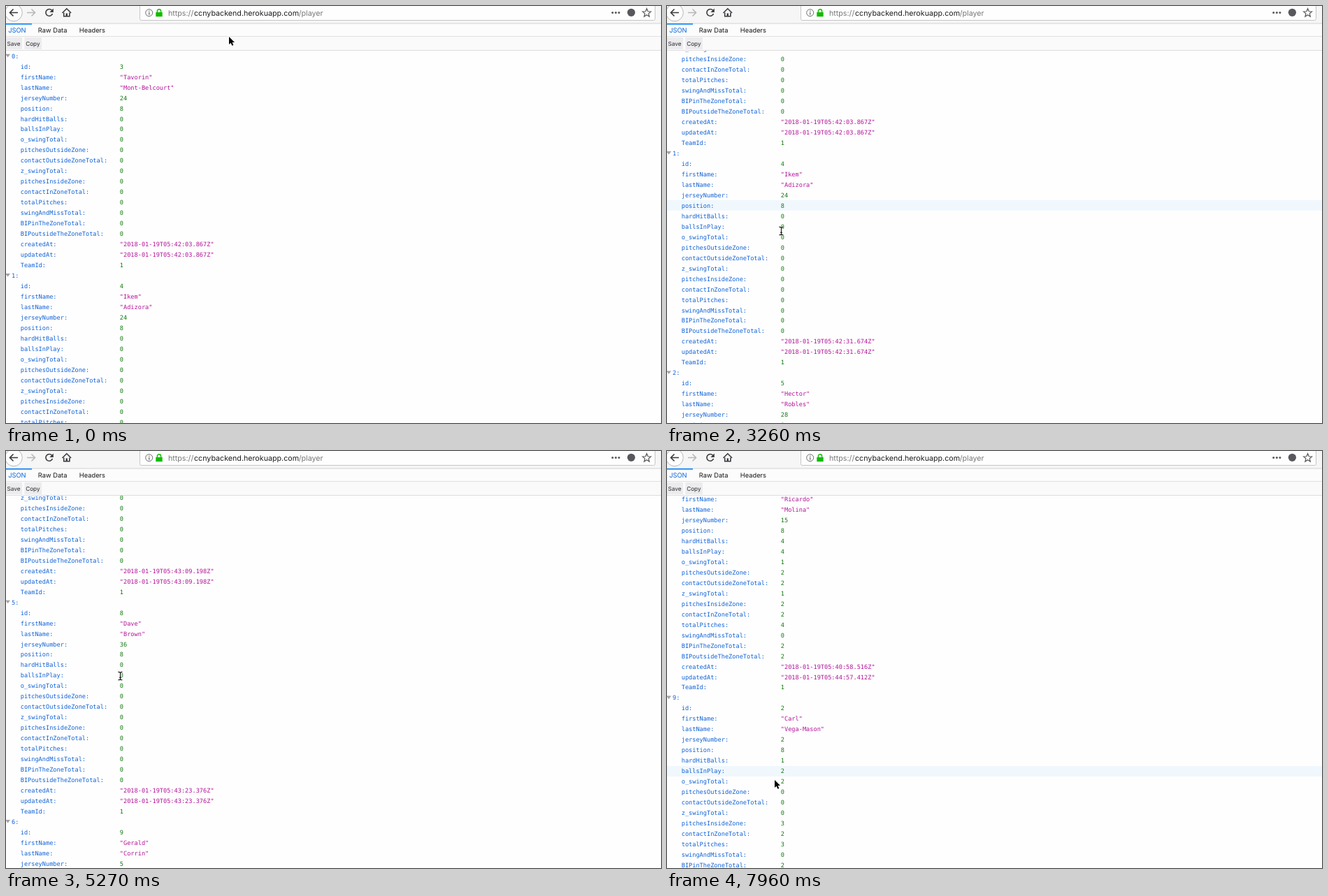
These frames come from a looping animation (937x597 px, 8 s). An HTML page with a canvas:

```html
<!DOCTYPE html>
<html lang="en">
<head>
<meta charset="utf-8">
<title>JSON viewer</title>
<style>
html, body { margin: 0; width: 100%; height: 100%; overflow: hidden; background: #fefefe; }
canvas { display: block; }
</style>
</head>
<body>
<canvas id="stage" width="937" height="597"></canvas>
<script>
const W = 937, H = 597, LOOP = 8000;
const ctx = document.getElementById('stage').getContext('2d');
const MONO = '8.62px "DejaVu Sans Mono", monospace';
const sans = px => px + 'px Inter, Roboto, sans-serif';
const BLUE = '#0f62d8', PINK = '#b4139a', GREEN = '#137a10', DARK = '#3b3b3f';

// Page content
const STATS = ['hardHitBalls', 'ballsInPlay', 'o_swingTotal', 'pitchesOutsideZone',
  'contactOutsideZoneTotal', 'z_swingTotal', 'pitchesInsideZone', 'contactInZoneTotal',
  'totalPitches', 'swingAndMissTotal', 'BIPinTheZoneTotal', 'BIPoutsideTheZoneTotal'];
const NONE = '000000000000';
const PLAYERS = [
  [3, 'Tavorin', 'Mont-Belcourt', 24, NONE, '42:03.867'],
  [4, 'Ikem', 'Adizora', 24, NONE, '42:31.674'],
  [5, 'Hector', 'Robles', 28, NONE, '42:43.216'],
  [6, 'Daniel', 'Ortega', 11, NONE, '42:56.430'],
  [7, 'Luis', 'Medina', 17, NONE, '43:09.198'],
  [8, 'Dave', 'Brown', 36, NONE, '43:23.376'],
  [9, 'Gerald', 'Corrin', 5, NONE, '43:38.052'],
  [10, 'Peter', 'Hollis', 21, NONE, '43:51.740'],
  [1, 'Ricardo', 'Molina', 15, '441221224022', '40:58.516', '44:57.412'],
  [2, 'Carl', 'Vega-Mason', 2, '122000323020', '41:22.305', '45:10.128']
];
const quote = s => '"' + s + '"';
const stamp = s => quote('2018-01-19T05:' + s + 'Z');
const rows = PLAYERS.flatMap(([id, first, last, jersey, stats, made, changed = made], n) => [
  [n],
  ['id', id], ['firstName', quote(first)], ['lastName', quote(last)],
  ['jerseyNumber', jersey], ['position', 8],
  ...STATS.map((key, i) => [key, +stats[i]]),
  ['createdAt', stamp(made)], ['updatedAt', stamp(changed)], ['TeamId', 1]
]);
const PITCH = 14.967, FIRST = 71.6, TOP = 64;

// Screen updates: [first time, last time, count]
const ticks = [0];
for (const [a, b, n] of [[140, 1170, 8], [1320, 2350, 8], [2500, 3410, 7], [3550, 4030, 4],
  [4180, 4470, 3], [4620, 5270, 5], [5420, 5570, 2], [5720, 6010, 3], [6750, 7670, 7], [7810, 7960, 2]])
  for (let i = 0; i < n; i++) ticks.push(a + (b - a) * i / (n - 1));

// Keys are [tick, values...]
const SCROLL = [[17, 0], [18, 22], [21, 139], [22, 175], [23, 184], [27, 383.5], [31, 760],
  [35, 1426.6], [37, 1960], [39, 2440], [40, 2547]];
const POINTER = [[0, 319, 44], [2, 321, 72], [4, 332, 122], [5, 345, 124], [7, 366, 101], [8, 376, 75],
  [9, 398, 46], [10, 418, 16], [11, 420, 9], [12, 400, 8], [14, 320, 34], [16, 225, 90],
  [17, 163, 322], [40, 163, 322], [46, 172, 417], [47, 171, 440], [48, 162, 458], [49, 154, 471]];

function track(keys, k) {
  if (k <= keys[0][0]) return keys[0].slice(1);
  for (let i = 1; i < keys.length; i++) {
    const a = keys[i - 1], b = keys[i];
    if (k <= b[0]) {
      const u = (k - a[0]) / (b[0] - a[0]);
      return a.slice(1).map((v, j) => v + (b[j + 1] - v) * u);
    }
  }
  return keys[keys.length - 1].slice(1);
}
const scrollAt = k => track(SCROLL, k)[0];

// The hovered row trails the pointer, and freezes during the long scroll
function hoverRow(k) {
  const seen = k < 23 ? k - 1 : k < 40 ? 23 : Math.max(40, k - 1);
  if (seen < 0) return -1;
  const y = track(POINTER, seen)[1];
  return y < TOP ? -1 : Math.floor((y - FIRST + PITCH / 2 + scrollAt(seen)) / PITCH);
}

function rect(x, y, w, h, fill) {
  ctx.fillStyle = fill;
  ctx.fillRect(x, y, w, h);
}
function text(s, x, y, font, fill) {
  ctx.font = font;
  ctx.fillStyle = fill;
  ctx.fillText(s, x, y);
}
function line(d, color, width = 1.5) {
  ctx.strokeStyle = color;
  ctx.lineWidth = width;
  ctx.stroke(new Path2D(d));
}
function shape(d, fill) {
  ctx.fillStyle = fill;
  ctx.fill(new Path2D(d));
}
function disc(x, y, r, fill) {
  ctx.fillStyle = fill;
  ctx.beginPath();
  ctx.arc(x, y, r, 0, 7);
  ctx.fill();
}
function ring(x, y, r, color, width) {
  ctx.strokeStyle = color;
  ctx.lineWidth = width;
  ctx.beginPath();
  ctx.arc(x, y, r, 0, 7);
  ctx.stroke();
}

function drawRows(k) {
  const scroll = scrollAt(k), hover = hoverRow(k);
  ctx.save();
  ctx.beginPath();
  ctx.rect(0, TOP, W, H - TOP);
  ctx.clip();
  rows.forEach(([key, value], i) => {
    const y = FIRST + i * PITCH - scroll;
    if (y < TOP - 12 || y > H + 12) return;
    if (i === hover) rect(0, Math.round(y - PITCH / 2), W, 15, '#f0f8fd');
    const base = y + 3.1;
    if (value === undefined) {
      shape(`M-.8 ${y - 2.8}H6L2.6 ${y + 1.8}Z`, '#a3a3a6');
      text(key + ':', 8, base, MONO, BLUE);
    } else {
      text(key + ':', 20.7, base, MONO, BLUE);
      text(value, 162.8, base, MONO, typeof value === 'string' ? PINK : GREEN);
    }
  });
  ctx.restore();
}

function drawToolbar() {
  rect(0, 0, W, 25, '#f6f6f7');
  disc(11, 9.5, 12.3, '#fdfdfd');
  ring(11, 9.5, 12.3, '#b9b9bb', 1);
  line('M17 9.5H5.5M10.5 4.5L5.5 9.5L10.5 14.5', DARK, 1.6);
  line('M30 9.5H41.5M36.5 4.5L41.5 9.5L36.5 14.5', '#b8b8ba', 1.6);
  line('M65.6 6.2A4.9 4.9 0 1 0 66.5 11', DARK, 1.6);
  shape('M67.8 3.6V9H62.4Z', DARK);
  line('M80.5 10L86.8 3.8L93.1 10', DARK, 1.6);
  line('M82.7 9.5V14.8H90.9V9.5', DARK, 1.6);
  rect(85.6, 10.5, 2.4, 4.3, DARK);

  ctx.beginPath();
  ctx.roundRect(191.5, -8, 737, 28.5, 2);
  ctx.fillStyle = '#fefefe';
  ctx.fill();
  ctx.strokeStyle = '#c6c6c8';
  ctx.lineWidth = 1;
  ctx.stroke();
  ring(204.7, 9.7, 5, '#6c6c70', 1);
  rect(204.1, 9, 1.3, 3.7, '#6c6c70');
  rect(204.1, 6.7, 1.3, 1.3, '#6c6c70');
  line('M216.4 10V7.3A2.6 2.6 0 0 1 221.6 7.3V10', '#12bc00', 1.5);
  rect(214.3, 9, 9.4, 6.2, '#12bc00');
  const url = sans(10.7);
  text('https://', 232, 14, url, '#77777a');
  text('ccnybackend.herokuapp.com', 269, 14, url, '#1d1d20');
  text('/player', 418.7, 14, url, '#77777a');
  for (let i = 0; i < 3; i++) disc(867.7 + i * 4.6, 9.6, 1.5, '#58585c');
  disc(894.4, 9.3, 5.6, '#58585c');
  let star = '';
  for (let i = 0; i < 10; i++) {
    const a = i * Math.PI / 5, r = i % 2 ? 2.8 : 6.3;
    star += (i ? 'L' : 'M') + (916.6 + r * Math.sin(a)) + ' ' + (10 - r * Math.cos(a));
  }
  line(star + 'Z', '#58585c', 1.2);
}

function drawTabs() {
  rect(0, 25, W, 18, '#fcfcfc');
  rect(0, 24.5, W, 1, '#d3d3d5');
  rect(0, 25, 37, 1.6, '#0a84ff');
  const tab = sans(9.3);
  text('JSON', 3.2, 37.7, tab, '#0a68dc');
  text('Raw Data', 45.8, 37.7, tab, '#18181a');
  text('Headers', 104.8, 37.7, tab, '#18181a');
  rect(0, 43, W, 1, '#e1e1e3');
  rect(0, 44, W, 19, '#fafafb');
  rect(0, 45, 23, 17, '#ececee');
  rect(26.5, 45, 24.5, 17, '#ececee');
  text('Save', 1.6, 56.8, sans(8.2), '#2a2a2e');
  text('Copy', 28.2, 56.8, sans(8.2), '#2a2a2e');
  rect(0, 63, W, 1, '#dededf');
}

function drawPointer(k) {
  const [x, y] = track(POINTER, k);
  ctx.save();
  ctx.translate(x, y);
  if (k >= 17 && k <= 40) {
    const beam = 'M-2.6 -5.6Q-.4 -5.6 .5 -4.6Q1.4 -5.6 3.4 -5.6M.5 -4.6V4.8M-2.6 5.8Q-.4 5.8 .5 4.8Q1.4 5.8 3.4 5.8M-1 2.2H2';
    line(beam, 'rgba(255,255,255,.8)', 2.4);
    line(beam, '#151515', 1.1);
  } else {
    const arrow = 'M0 0V11L2.5 8.7L4.4 12.8L6.4 11.9L4.6 7.9H8Z';
    line(arrow, '#fff', 1.7);
    shape(arrow, '#000');
  }
  ctx.restore();
}

function draw(now) {
  const t = now % LOOP;
  let k = ticks.length - 1;
  while (k > 0 && ticks[k] > t + 0.5) k--;
  ctx.textRendering = 'geometricPrecision';
  rect(0, 0, W, H, '#fefefe');
  drawRows(k);
  drawToolbar();
  drawTabs();
  drawPointer(k);
}

const start = performance.now();
function loop() {
  draw(performance.now() - start);
  requestAnimationFrame(loop);
}
loop();
</script>
</body>
</html>
```
